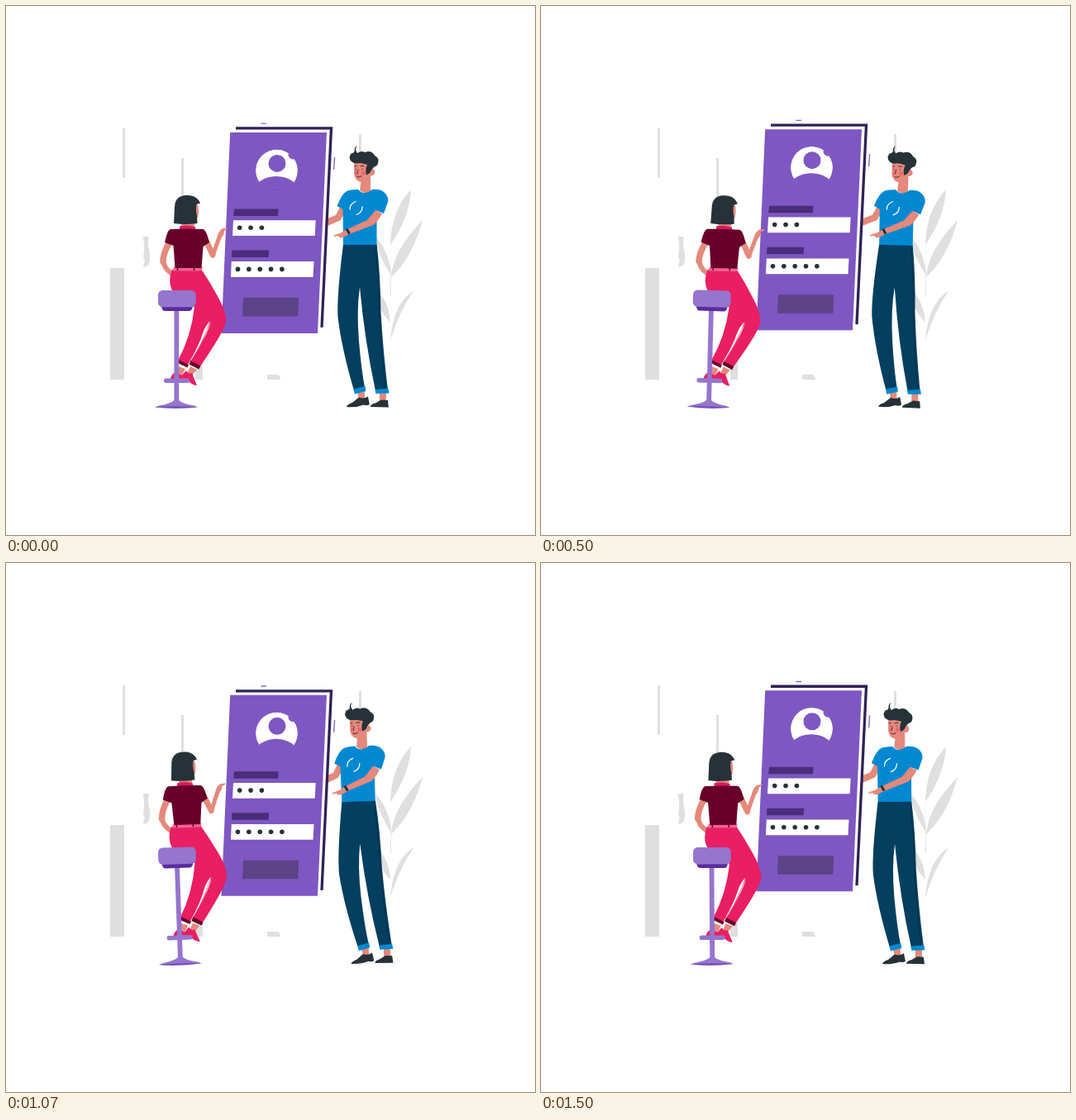
Animation of 640x640 px, one loop 1.57 s. Source, as an HTML page:

```html
<!DOCTYPE html>
<html lang="en">
<head>
<meta charset="utf-8">
<title>Login scene</title>
<style>
  html, body { margin: 0; width: 100%; height: 100%; overflow: hidden; background: #fff; }
  svg { display: block; width: 100vw; height: 100vh; }
  .grey { fill: #dfdfdf; }
  .ink { fill: #263238; }
  .skin { fill: #e4897b; }
  .limb { fill: none; stroke: #e4897b; stroke-linecap: round; stroke-linejoin: round; }
  .violet { fill: #7e57c2; }
  .lilac { fill: #9575cd; }
  .label { fill: #4a2d7b; }
  .wine { fill: #68002a; }
  .pink { fill: #e91e63; }
  .blue { fill: #0288d1; }
  .navy { fill: #043f5f; }
  .white { fill: #fff; }
  .line { fill: none; stroke-linecap: round; }
</style>
</head>
<body>
<svg viewBox="0 0 640 640">
  <defs>
    <clipPath id="avatar"><circle cx="327.5" cy="199.2" r="25.5"/></clipPath>
  </defs>

  <g class="grey">
    <path d="M141 148h3v60h-3zM212 184h3v50h-3zM427 155h3v30h-3zM126 317h17v135h-17zM229 370h9v82h-9z"/>
    <path d="M165.500 279h7.500q-2 8 0 16 2 7 1 13-1 8-8 8 1-6 2-8-3-4-1-10 1-9-1.500-19z"/>
    <path d="M316 446h12q3 0 4 6h-16z"/>
    <path d="M490 222Q466 247 465 289Q488 256 490 222z"/>
    <path d="M504 259Q468 296 466 328Q492 304 504 259z"/>
    <path d="M493.500 344Q468 360 465 405Q475 371 493.500 344z"/>
    <path d="M448 280Q464 298 466 326Q454 308 448 288z"/>
    <path d="M452 347Q464 362 465 383Q456 374 452 364z"/>
    <path d="M465 282L466 350 465 352z"/>
  </g>

  <g class="man">
    <path class="limb" stroke-width="8" d="M407 246L402 256 388 262"/>
  </g>

  <g id="phone">
    <path class="white" d="M278 149H393L382 388H377L388 153H278z"/>
    <path d="M278 148H393.500L382 389" fill="none" stroke="#2f2156" stroke-width="3.300"/>
    <path d="M308.500 142.200h6.500M397.600 183L396.600 198" fill="none" stroke="#8a66cc" stroke-width="1.400"/>
    <path class="violet" d="M271.200 153H388L377 396H260.500z"/>
    <g clip-path="url(#avatar)">
      <circle class="white" cx="327.500" cy="199.200" r="25.500"/>
      <circle class="violet" cx="328" cy="190.500" r="10.500"/>
      <ellipse class="violet" cx="327" cy="227" rx="28" ry="21"/>
      <circle class="violet" cx="347.500" cy="179.500" r="6"/>
      <circle cx="327.500" cy="199.200" r="25.300" fill="none" stroke="#7250ac" stroke-width=".8" stroke-dasharray="48 200" stroke-dashoffset="-16"/>
    </g>
    <path class="label" d="M276 245.500H329.500L329 254H275.200zM273.500 295.500H318.200L317.600 304H273z"/>
    <path class="white" d="M275 259.300H374.700L373.700 278H274zM272.800 309.200H372.500L371.500 328H272z"/>
    <g id="dots" class="ink"></g>
    <path d="M287 353H354.200L353.200 375.500H286z" fill="#5c4287"/>
  </g>

  <g class="man">
    <path class="skin" d="M425 464L434 463 434 477H427zM452 466H460V480H452z"/>
    <path class="ink" d="M412 485Q413 482 419 480L427 473.500Q433 476 438 472.500L440 482Q437 484 433 482.500Q424 486 412 485zM441 485Q441 482 447 480.500L454 476.500 462 477 463 485.500z"/>
    <path class="navy" d="M408 288H448.500Q453 325 453.500 370Q456 415 462 464L447 465Q434 405 428 340Q424 368 427 405Q430 440 434 461L421 465Q406 414 401.500 376Q400 352 408 288z"/>
    <path class="line" d="M447 291Q451 330 451.500 372Q454 420 459 463" stroke="#022f49" stroke-width=".9"/>
    <path class="blue" d="M420.500 463.500L434.500 460 435.500 466 422 469.500zM446.500 464L462.500 462.500 463.500 468.500 447.500 469z"/>
    <path class="skin" d="M430 206L441 203 441 224Q435 229 428 223z"/>
    <path class="skin" d="M421 188H440V203Q437 213 430 213Q422 212 421 203z"/>
    <circle class="skin" cx="442" cy="201" r="4.200"/>
    <circle cx="424" cy="202" r="2.200" fill="#e8677a"/>
    <circle cx="432.500" cy="202" r="2.500" fill="#e8677a"/>
    <path class="line" d="M422 194q1-1 2 0M429 194q2-1.500 4 0M423.500 197v.8M431 197v.8M426 198l-1 4.500M424.500 206q3 2 5.500-.5" stroke="#5c2c33" stroke-width="1"/>
    <path class="ink" d="M425 169Q421 173 425 178Q430 174.500 434 177Q442 174 446 181Q452 184 450 190Q449 194 446 194Q442 197 440 202L436 204.500Q434 198 437 192Q428 189 424 190.500Q416 190 415.500 183Q416 178 422 178.500Q418 180 415.500 179Q423 178 421.500 173Q422 170 425 169z"/>
    <path class="blue" d="M426 222Q433 230 443 222Q453 221 458 226Q463 231 462 237L457 251 448.500 247.500V289H408L407.500 246 400.500 242Q406 227 413 223.500Q419 222 426 222z"/>
    <path class="line" d="M416 246Q416 239 423 236.500M431 243Q431 250 424 252.500" stroke="#fff" stroke-width="1.300"/>
    <path class="skin" d="M447 247L455 251Q450 261 444 265L415 276Q408 281 403 280L402 278 397 279 396.500 277.500 405 274.500 412 270.500 437 259z"/>
    <path d="M412 269.500L415.500 275.500" stroke="#263238" stroke-width="3"/>
  </g>

  <g id="woman">
    <path class="limb" stroke-width="7.500" d="M197 287Q190 300 190 309"/>
    <path class="limb" stroke-width="6" d="M190 306Q190 317 201 324"/>
    <path class="limb" stroke-width="7" d="M243 286L250 301"/>
    <path class="limb" stroke-width="5" d="M250 302L259 277"/>
    <path class="skin" d="M256 279Q257 272 262 269L268 268.500V270L264.500 271.500 263 277 260 281z"/>
    <path class="skin" d="M229 238L232.500 242 233 249 232 256 227 258zM212 260H228V269H212zM209 436L217 439 213 447 207 447zM223 436L231 440 225 447 219 445z"/>
    <path class="pink" d="M205 443L213 447 216 451H199Q200 446 205 443zM218 441Q221 446 225 444L231 459Q226 459 221 454L211 449z"/>
    <path class="pink" d="M201 319L236 318Q248 336 257 353Q267 371 266 382Q264 394 235 436L223 430Q242 402 248 382Q244 390 239 403Q229 422 220 434L208 429Q224 400 228 364Q212 361 202 346Q195 333 201 319z"/>
    <path d="M247 381Q240 403 225 427L220 434Q234 410 238 396Q241 387 247 381z" fill="#f8f8f8"/>
    <path class="wine" d="M209.500 428.500L221 434 219.500 437.500 208 432zM223.500 429L235.500 435.500 233.500 439.500 221.500 433.500z"/>
    <path d="M203 316H238L236 320.500H202z" fill="#f06292"/>
    <path d="M210 266.500Q220 264 229 267.500V271H210z" fill="#d81b60"/>
    <path class="wine" d="M199 270Q219 269 238 270Q242 270 246 286L238.500 291 236.500 317H204.500L202.500 290 192 286Q195 271 199 270z"/>
    <path d="M207.500 315V320M227.500 315V320" stroke="#68002a" stroke-width="1.500"/>
    <path class="ink" d="M203 263Q203.500 253 204 242Q205 230 217 229Q228 228 233 235L235 238.500 230.500 240Q229 247 231 254L231.500 263Q217 265 203 263z"/>

    <path class="lilac" d="M203.500 368H209.300V477Q213 481 228 483.500L232 485.500Q206 488 180 485.500L185 483.500Q200 481 203.500 477z"/>
    <rect class="lilac" x="191" y="450.500" width="31" height="5.500" rx="2.700"/>
    <path d="M180 485Q206 483.500 232 485Q206 488.500 180 485z" fill="#7450b5"/>
    <path d="M188 363H226Q225 369 222 369H192Q189 369 188 363z" fill="#5a2ca0"/>
    <rect class="lilac" x="184" y="344" width="45.700" height="20.300" rx="5.500"/>
  </g>
</svg>
<script>
  const LOOP = 1570, STEPS = 22, LOWEST = 4.9;
  const phone = document.getElementById("phone");
  const woman = document.getElementById("woman");
  const man = document.querySelectorAll(".man");

  const dotRow = (count, x, y) => Array.from({ length: count }, (_, i) =>
    `<circle cx="${x + i * 13.35}" cy="${y}" r="2.8"/>`).join("");
  document.getElementById("dots").innerHTML = dotRow(3, 282.7, 268.3) + dotRow(5, 280.5, 318.5);

  // Triangle wave from -1 (at step 0) to 1 and back
  const triangle = step => 1 - 2 * Math.abs(1 - 2 * ((step + STEPS) % STEPS) / STEPS);

  function draw() {
    const time = performance.now() % LOOP;
    const step = Math.floor((time + 5) / LOOP * STEPS) % STEPS;
    const drop = 0.7 + 7.3 * triangle(step - LOWEST);
    const lean = -drop * (drop < 0 ? 1.25 : 0.95);

    phone.setAttribute("transform", `translate(0 ${drop})`);
    woman.setAttribute("transform", `rotate(${lean * 0.31} 207 350)`);
    man.forEach(part => part.setAttribute("transform", `rotate(${lean * 0.32} 415 333)`));
    requestAnimationFrame(draw);
  }
  draw();
</script>
</body>
</html>
```
